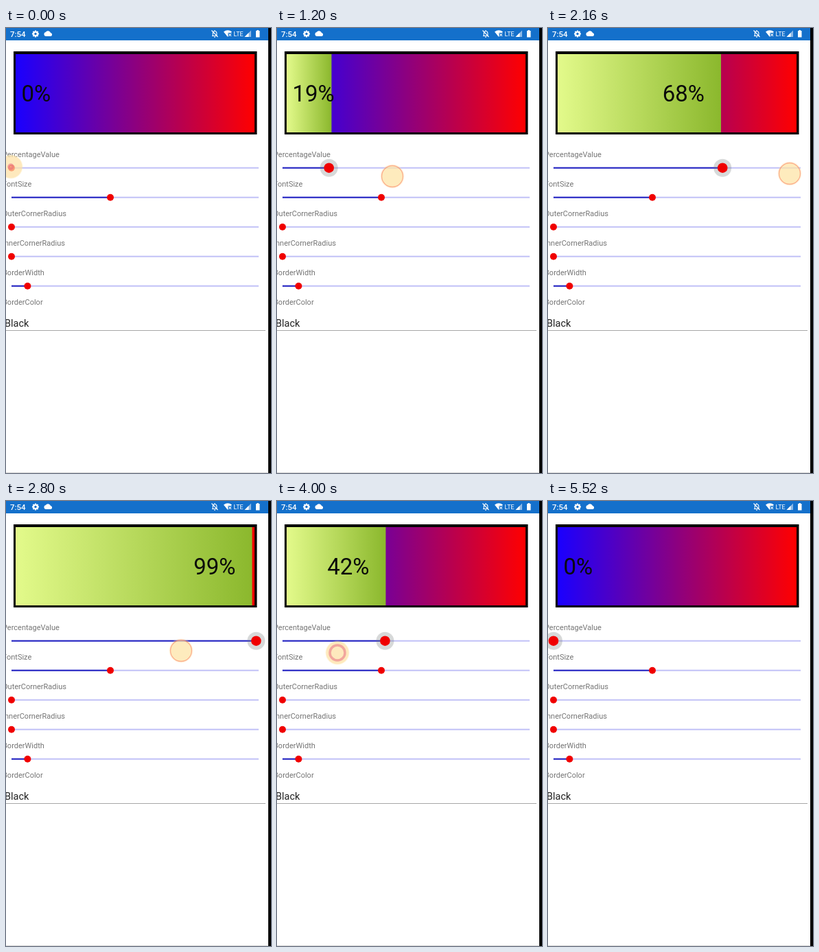
Recreate the animation shown at these times as an HTML page with a canvas. Size 386x648 px, loop 5600 ms.

```html
<!DOCTYPE html>
<html lang="en">
<head>
<meta charset="utf-8">
<title>Percentage bar</title>
<style>
html, body { margin: 0; width: 100%; height: 100%; overflow: hidden; background: #fff; }
canvas { display: block; }
</style>
</head>
<body>
<canvas id="stage" width="386" height="648"></canvas>
<script>
const ctx = document.getElementById('stage').getContext('2d');
const LOOP = 5600, STEP = 80;

// Keyframes: [time, value, ...]
const percentKeys = [
  [720, 0], [900, 3.5], [1200, 18.8], [2160, 68.4], [2800, 99], [2960, 100],
  [3200, 95.8], [4000, 41.5], [4880, 12.9], [5440, 0]
];
const touchKeys = [ // x, y, ring radius
  [0, 7, 202, 3], [320, 10, 205, 16], [1200, 168, 216, 16], [1600, 256, 222, 16],
  [1920, 328, 217, 16], [2160, 352, 212, 16], [2360, 369, 214, 16],
  [2800, 255, 218, 16], [3500, 150, 226, 16], [4000, 88, 221, 11],
  [4480, 34, 231, 5], [4720, 4, 236, 3]
];

function sample(keys, t) {
  const next = keys.findIndex(key => key[0] > t);
  if (next === 0) return keys[0].slice(1);
  if (next < 0) return keys[keys.length - 1].slice(1);
  const a = keys[next - 1], b = keys[next];
  const u = (t - a[0]) / (b[0] - a[0]);
  return a.slice(1).map((v, i) => v + (b[i + 1] - v) * u);
}

function rect(x, y, w, h, color) {
  ctx.fillStyle = color;
  ctx.fillRect(x, y, w, h);
}

function circle(x, y, r, color) {
  ctx.fillStyle = color;
  ctx.beginPath();
  ctx.arc(x, y, r, 0, 2 * Math.PI);
  ctx.fill();
}

function shape(path, color) {
  ctx.fillStyle = color;
  ctx.fill(new Path2D(path));
}

function stroke(path, color, width) {
  ctx.strokeStyle = color;
  ctx.lineWidth = width;
  ctx.stroke(new Path2D(path));
}

function text(str, x, y, size, color, weight = 400) {
  ctx.font = `${weight} ${size}px Roboto, sans-serif`;
  ctx.fillStyle = color;
  ctx.fillText(str, x, y);
}

function gradient(x, w, from, to) {
  const g = ctx.createLinearGradient(x, 0, x + w, 0);
  g.addColorStop(0, from);
  g.addColorStop(1, to);
  return g;
}

function statusBar() {
  const blue = '#1470cb';
  rect(0, 0, 382, 18, blue);
  text('7:54', 6, 13, 11.5, '#fff', 500);

  for (let i = 0; i < 4; i++) {
    const a = i * Math.PI / 4, dx = 5 * Math.cos(a), dy = 5 * Math.sin(a);
    stroke(`M${43 - dx} ${8.5 - dy}L${43 + dx} ${8.5 + dy}`, '#fff', 2.2);
  }
  circle(43, 8.5, 3.8, '#fff');
  circle(43, 8.5, 1.7, blue);

  shape('M58 12a3 3 0 0 1-.3-5.9a4 4 0 0 1 7.3 1a2.5 2.5 0 0 1 .2 4.9z', '#fff');

  stroke('M300 11.5h8M301.3 11V7.5a2.8 2.8 0 0 1 5.6 0V11M304 3v2M303 13.3h2M299.5 3.5l9 9.5', '#fff', 1.1);

  shape('M317 5.5q6-4.5 12 0l-6 7.5z', '#fff');
  rect(323.5, 7, 6, 6, blue);
  stroke('M324.5 8l3.6 4M328.1 8l-3.6 4', '#fff', 1.1);

  text('LTE', 331.5, 12, 9, '#fff');
  shape('M347.5 13L357 3.5V13z', '#8db8e5');
  shape('M347.5 13L353.5 7V13z', '#fff');
  rect(364, 4, 5.5, 9.5, '#fff');
  rect(365.6, 3, 2.3, 1, '#fff');
}

function percentBar(percent) {
  rect(11, 34, 354.5, 121, '#000');
  rect(14, 38, 348, 114, gradient(14, 348, '#1a00ff', '#ff0000'));
  const filled = 348 * percent / 100;
  if (filled > 0) rect(14, 38, filled, 114, gradient(14, filled, '#e3fa8b', '#8bb82d'));

  const label = Math.round(percent) + '%';
  ctx.font = '400 33px Roboto, sans-serif';
  const x = Math.max(22.5, 14 + filled - 24 - ctx.measureText(label).width);
  text(label, x, 107, 33, '#0a0a0a');
}

function slider(label, y, percent, pressed) {
  text(label, -5, y - 15.5, 11, '#757575');
  const x = 8 + 3.6 * percent;
  rect(8, y - 1, 360, 2, '#c1c1f7');
  rect(8, y - 1, x - 8, 2, '#2222c0');
  if (pressed) circle(x, y, 13, 'rgba(110,120,120,.28)');
  circle(x, y, pressed ? 7.3 : 5, '#f00000');
}

function touch(t) {
  const [x, y, ring] = sample(touchKeys, t);
  const wide = ring > 14;
  circle(x, y, 17.5, 'rgba(255,228,160,.3)');
  circle(x, y, wide ? 15.5 : 16.5, 'rgba(254,226,165,.6)');
  ctx.strokeStyle = wide ? 'rgba(250,130,95,.6)' : 'rgba(230,100,125,.5)';
  ctx.lineWidth = wide ? 1.3 : 3.5;
  ctx.beginPath();
  ctx.arc(x, y, wide ? 15.5 : ring, 0, 2 * Math.PI);
  ctx.stroke();
}

function draw(t) {
  const [percent] = sample(percentKeys, t);
  rect(0, 0, 386, 648, '#fff');
  statusBar();
  percentBar(percent);

  slider('PercentageValue', 203.7, percent, t >= 640);
  slider('FontSize', 246.7, 40);
  slider('OuterCornerRadius', 289.7, 0);
  slider('InnerCornerRadius', 332.7, 0);
  slider('BorderWidth', 375.7, 6.5);
  text('BorderColor', -5, 403, 11, '#757575');
  text('Black', -2, 435, 14.5, '#212121');
  rect(0, 440, 378, 1, '#a6a6a6');

  if (t < 4720) touch(t);
  rect(0, 647, 382, 1, '#d8d8d8');
  rect(382, 0, 4, 648, '#000');
}

function tick() {
  draw(Math.floor(performance.now() % LOOP / STEP) * STEP);
  requestAnimationFrame(tick);
}
tick();
</script>
</body>
</html>
```
